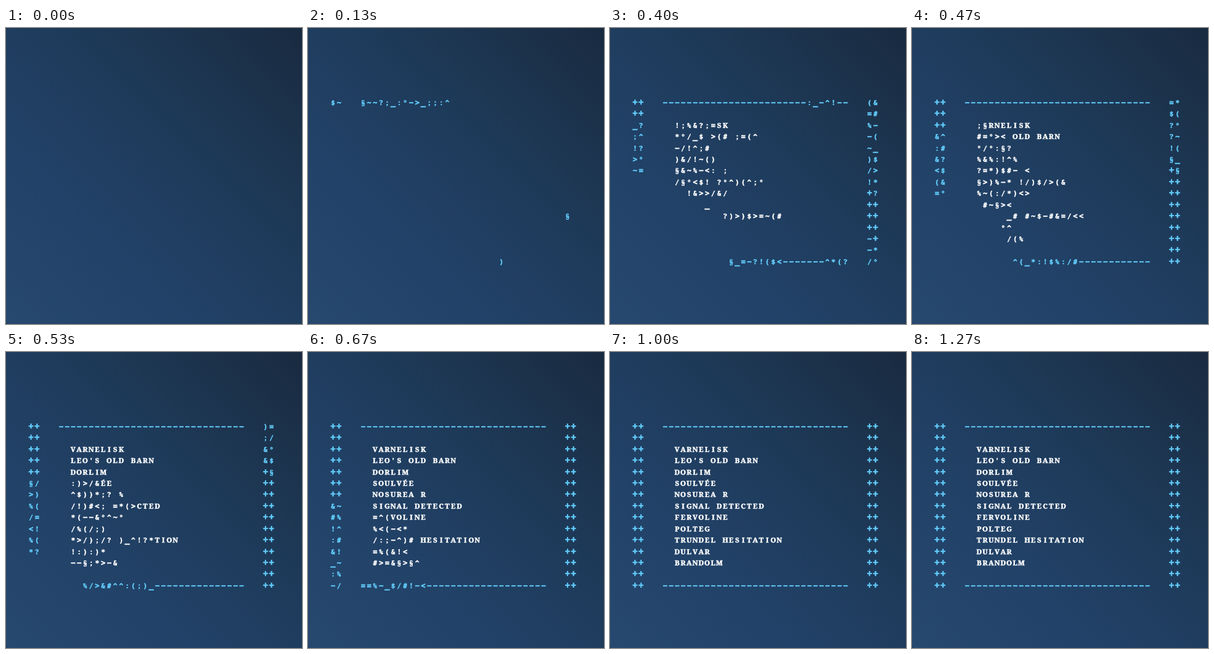
An HTML page with a canvas for the animation above (1.34 s loop, 480 by 480 pixels).

```html
<!DOCTYPE html>
<html lang="en">
<head>
<meta charset="utf-8">
<title>Scrambled text reveal</title>
<style>
  html, body { margin: 0; width: 100%; height: 100%; overflow: hidden; }
  html { background: #1c2633; }
  body { border-radius: 3px; background: linear-gradient(45deg, #27486f 0%, #224268 30%, #1e3b5b 58%, #1c324b 82%, #182a40 100%); }
  canvas { display: block; width: 480px; height: 480px; }
</style>
</head>
<body>
<canvas id="stage" width="480" height="480"></canvas>
<script>
const ctx = document.getElementById('stage').getContext('2d');
const LOOP = 1340, STEP_X = 9.75, STEP_Y = 18.43, X0 = 40.6, Y0 = 124.8;
const NOISE = '!=$°_~:§()<>*?;#&%−^/';
const BLUE = '#64d0ff', WHITE = '#fff';
const SERIF = '"Noto Serif", serif', MONO = '"DejaVu Sans Mono", monospace';

// text, first start, advance per letter, latest start, scramble length
const LINES = [
  ['VARNELISK', 3.89, .2, 9, 3.5],
  ["LEO'S OLD BARN", 3.95, .1, 9, 3.5],
  ['DORLIM', 4.45, .16, 9, 3.5],
  ['SOULVÉE', 5.7, .25, 9, 3.5],
  ['NOSUREA R', 5.98, .15, 9, 3.5],
  ['SIGNAL DETECTED', 7.2, .25, 5.9, 3.5],
  ['FERVOLINE', 6.39, .2, 9, 4.1],
  ['POLTEG', 7.2, .25, 9, 4.1],
  ['TRUNDEL HESITATION', 8.28, .3, 7.9, 3.9],
  ['DULVAR', 7.8, .25, 9, 4],
  ['BRANDOLM', 7.99, .2, 9, 4.3]
];

// Start steps along each border, interpolated between points
const LEFT = [[0, 1.5], [3, 3.6], [4, 4.05], [6, 5.8], [7, 6.3], [10, 7.6], [11, 7.9], [14, 9.5]];
const RIGHT = [[0, 5.7], [4, 4.45], [5, 3.95], [8, 2.45], [10, 2], [12, 2.55], [14, 3.3]];
const BOTTOM = [[0, 9.4], [4, 7.95], [5, 7.75], [11, 5.9], [16, 4.08], [17, 3.8],
  [20, 2.2], [23, 2], [25, 2.4], [26, 2.65], [30, 3.5]];

function lerp(points, x) {
  const i = Math.max(1, points.findIndex(p => p[0] >= x));
  const [x0, y0] = points[i - 1], [x1, y1] = points[i];
  return y0 + (y1 - y0) * (x - x0) / (x1 - x0);
}

const cells = [];
function add(char, col, row, start, length, color) {
  cells.push({ char, col, row, start, end: start + length, color });
}

for (let row = 0; row < 15; row++) {
  for (let k = 0; k < 2; k++) {
    add('+', k, row, lerp(LEFT, row), 3.7 + .05 * row, BLUE);
    add('+', 39 + k, row, lerp(RIGHT, row) + (row < 11 ? .1 : -.1) * k, 3.5, BLUE);
  }
}
for (let i = 0; i < 31; i++) {
  add('−', 5 + i, 0, 1.2 + .056 * i, 3.5, BLUE);
  add('−', 5 + i, 14, lerp(BOTTOM, i), 4.5 - .04 * i, BLUE);
}
LINES.forEach(([text, first, gain, latest, length], n) => {
  [...text].forEach((char, i) => {
    if (char !== ' ') add(char, 7 + i, 2 + n, Math.min(latest, first - gain * i), length, WHITE);
  });
});

function noise(cell, step) {
  let h = Math.imul(cell + 1, 374761393) ^ Math.imul(step + 1, 668265263);
  h = Math.imul(h ^ (h >>> 13), 1274126177);
  return NOISE[((h ^ (h >>> 16)) >>> 0) % NOISE.length];
}

function fontFor(char) {
  if (/[A-ZÉ']/.test(char)) return `900 11.5px ${SERIF}`;
  if (/[!?$;:§]/.test(char)) return `900 11px ${SERIF}`;
  const size = /[+_]/.test(char) ? 13.5 : /[−=<>~]/.test(char) ? 12 : /[&#%]/.test(char) ? 10 : 11;
  return `bold ${size}px ${MONO}`;
}

ctx.textAlign = 'center';
ctx.lineJoin = 'round';
ctx.lineWidth = .5;

function draw(step) {
  ctx.clearRect(0, 0, 480, 480);
  cells.forEach((c, i) => {
    if (step < c.start) return;
    const char = step < c.end ? noise(i, step) : c.char;
    const x = X0 + c.col * STEP_X, y = Y0 + c.row * STEP_Y;
    ctx.font = fontFor(char);
    ctx.fillStyle = ctx.strokeStyle = c.color;
    ctx.fillText(char, x, y);
    ctx.strokeText(char, x, y);
  });
}

// 15 steps per second, snapped to 10 ms
function tick() {
  const t = performance.now() % LOOP;
  draw(Math.floor((Math.floor(t / 10) + .5) * .15));
  requestAnimationFrame(tick);
}
tick();
</script>
</body>
</html>
```
